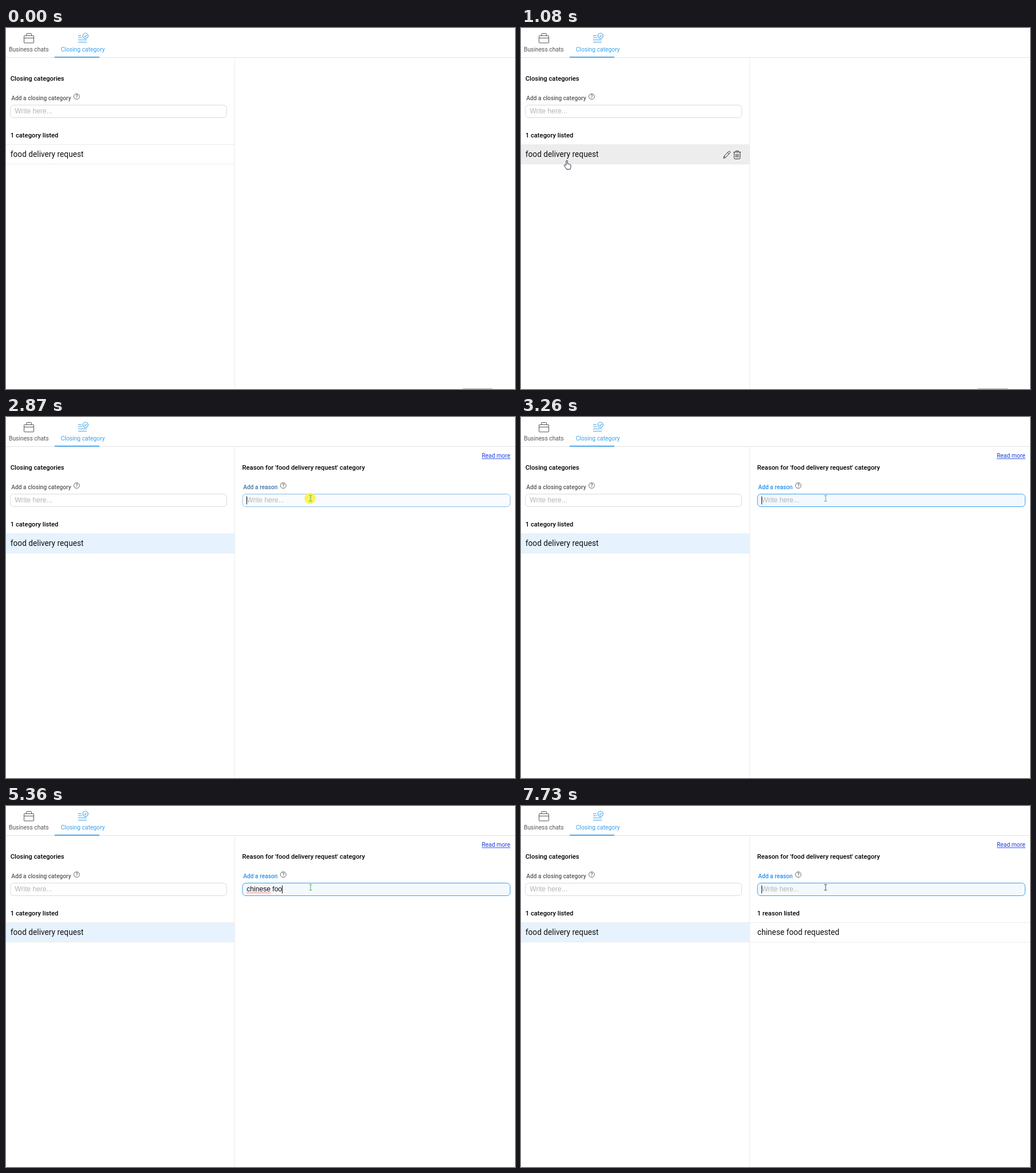
An HTML page for the animation above (8000 ms loop, 889 by 630 pixels).

```html
<!DOCTYPE html>
<html lang="en">
<head>
<meta charset="utf-8">
<title>Closing categories</title>
<style>
html, body { margin: 0; width: 100%; height: 100%; overflow: hidden; background: #fff; }
svg { display: block; }
text { font-family: Roboto, sans-serif; fill: #111; white-space: pre; }
.tab { font-size: 10.32px; fill: #555; }
.head { font-size: 11.25px; font-weight: 500; fill: #000; }
.label { font-size: 10.2px; font-weight: 500; fill: #5a5a5a; }
.row { font-size: 13.74px; }
.input { font-family: "Liberation Sans", Arial, sans-serif; font-size: 12.08px; }
.hint { fill: #b4b4b4; }
.link { font-size: 10.32px; fill: #1a3fe0; }
.blue { fill: #3b9fe8; }
.rule { stroke: #ececec; }
.icon { fill: none; stroke: #555; }
.field { fill: #fff; stroke: #d9d9d9; }
.q { font-size: 8.5px; fill: #444; text-anchor: middle; }
</style>
</head>
<body>
<svg width="889" height="630" viewBox="0 0 889 630">
  <defs>
    <g id="help">
      <circle r="4.9" class="icon" stroke-width=".9"/>
      <text class="q" y="3">?</text>
    </g>
  </defs>

  <!-- header -->
  <g class="icon">
    <rect x="31.5" y="13.5" width="17" height="12.5" rx=".6"/>
    <path d="M31.5 17.5h17M35.5 13.5v-3q0-1 1-1h7q1 0 1 1v3"/>
  </g>
  <g class="icon" style="stroke:#3b9fe8" stroke-width="1.1">
    <path d="M126 13.5h5.5M126 17h6.5M126 20.7h15M126 24.7h15"/>
    <circle cx="138.8" cy="13.6" r="4.6"/>
    <path d="M136.6 13.7l1.7 1.6 2.9-3.2"/>
  </g>
  <text class="tab" x="5" y="41.4">Business chats</text>
  <text class="tab blue" x="95.7" y="41.4">Closing category</text>
  <path d="M0 51.5H889" stroke="#e2e2e2"/>
  <path class="blue" d="M85 50h78v1.8h-78z"/>
  <path class="rule" d="M399.5 52V630"/>
  <path id="dots" d="M798.5 629.5H850" stroke="#555" stroke-dasharray="1 1"/>

  <!-- left column -->
  <text class="head" x="7.7" y="91.8">Closing categories</text>
  <text class="label" x="9.3" y="126">Add a closing category</text>
  <use href="#help" x="123.4" y="119.6"/>
  <rect class="field" x="7.5" y="134.5" width="378" height="22" rx="6"/>
  <text class="input hint" x="15.3" y="149.4">Write here...</text>
  <text class="head" x="7.7" y="190.8">1 category listed</text>
  <rect id="rowBg" y="203" width="399" height="35" fill="none"/>
  <path class="rule" d="M0 203.5H399M0 237.5H399"/>
  <text class="row" x="7.7" y="224.8">food delivery request</text>
  <g id="tools" class="icon" style="stroke:#333">
    <path d="M353.8 227.4l.9-3.8 8-8.2q1.1-.9 2.2.2t.2 2.2l-8 8.3zM360.8 217.3l2.6 2.5M354.8 223.7l2.5 2.4"/>
    <path d="M371 216.6h13M375 216.4v-1.9h5v1.9M372.3 216.8v10.4q0 1.3 1.3 1.3h7.8q1.3 0 1.3-1.3v-10.4M375.2 219.5v6.5M377.5 219.5v6.5M379.8 219.5v6.5"/>
  </g>

  <!-- right column -->
  <g id="panel">
    <text class="link" x="831" y="71">Read more</text>
    <path d="M831 72.8h50" stroke="#1a3fe0" stroke-width=".9"/>
    <text class="head" x="412.5" y="91.8">Reason for 'food delivery request' category</text>
    <text id="label" class="label" x="414.3" y="126">Add a reason</text>
    <use href="#help" x="484.2" y="119.6"/>
    <rect id="field" class="field" x="413" y="134.5" width="467.5" height="22" rx="6"/>
    <text id="hint" class="input hint" x="420.3" y="149.4">Write here...</text>
    <text id="typed" class="input" x="420.3" y="149.4"></text>
    <path id="spell" d="M420.5 151.5H462" stroke="#d8434e" stroke-width="1.2" stroke-dasharray="1.3 .8"/>
    <path id="caret" d="M.5 138.5v14" stroke="#111"/>
    <g id="list">
      <text class="head" x="412.5" y="190.8">1 reason listed</text>
      <path class="rule" d="M400 203.5H889M400 237.5H889"/>
      <text class="row" x="412.7" y="224.8">chinese food requested</text>
    </g>
  </g>

  <!-- pointer -->
  <circle id="halo" r="9.8" fill="#fbf24a" opacity=".9"/>
  <g id="pointer">
    <path id="arrow" d="M0 0V14.5L3.4 11.4 5.6 16.6 7.8 15.7 5.6 10.6H10.2Z" fill="#fff" stroke="#222" stroke-width=".9"/>
    <path id="hand" d="M-1.2 8.4V1.3a1.2 1.2 0 0 1 2.4 0V6c1-.6 2-.4 2.4.6.8-.5 1.8-.2 2 .7.9-.2 1.4.3 1.4 1.3v3c0 1.5-.7 2.2-1 4h-6.4c-.5-2-3.4-4.5-4.2-6.3-.5-1.3.9-2 1.8-1.2z" fill="#fff" stroke="#1c2333"/>
    <path id="beam" d="M-2.6-5h2q.6 0 .6.7v8.6q0 .7-.6.7h-2M2.6-5h-2q-.6 0-.6.7M2.6 5h-2q-.6 0-.6-.7" fill="none"/>
  </g>
</svg>
<script>
const LOOP = 8000;
const PHRASE = "chinese food requested";
const KEYS = [3400, 3600, 3780, 3960, 4120,
  4670, 4800, 4930, 5060, 5190, 5320, 5460, 5590,
  6020, 6160, 6300, 6440, 6570, 6740, 6960, 7260, 7400];
const SELECT = 1540, FOCUS = 2870, SUBMIT = 7560, LISTED = 7730;
const MOVES = [[1920, 135, 224], [2030, 320, 192], [2140, 490, 160], [2250, 577, 144],
  [2310, 570, 144], [2420, 558, 143], [2530, 547, 143], [2640, 538, 142], [2750, 532, 142]];

const $ = {};
document.querySelectorAll("svg [id]").forEach(el => $[el.id] = el);
const show = (el, on) => el.style.display = on ? "" : "none";
const mix = (a, b, k) => `rgb(${a.map((v, i) => Math.round(v + (b[i] - v) * k))})`;

function pointerAt(t) {
  if (t < MOVES[0][0]) {
    const p = Math.min(8, Math.floor((t - 200) / 110)) / 8;
    const left = (1 - p) ** 2;
    return [80 + 487 * left, 231 + 276 * left];
  }
  return MOVES.filter(m => m[0] <= t).pop().slice(1);
}

function drawPointer(t) {
  const [x, y] = pointerAt(t);
  const overRow = t >= 200 && x < 399 && y > 203 && y < 238;
  const overField = t >= 2250;
  show($.pointer, t >= 200);
  $.pointer.setAttribute("transform", `translate(${x} ${y})`);
  show($.hand, overRow);
  show($.beam, overField);
  show($.arrow, !overRow && !overField);
  $.beam.setAttribute("stroke", t < FOCUS ? "#444" : t < SUBMIT ? "#45b552" : "#24653a");

  const rowClick = t >= 1390 && t < SELECT;
  show($.halo, rowClick || (t >= FOCUS && t < 3020));
  $.halo.setAttribute("transform", `translate(${x - 1} ${y + (rowClick ? 7 : 0)})`);

  show($.tools, overRow);
  $.rowBg.setAttribute("fill", t >= SELECT ? "#e6f3fe" : overRow ? "#ededed" : "none");
}

function drawField(t) {
  const focus = t < FOCUS ? 0 : t < 2960 ? .5 : t < 3020 ? .8 : 1;
  $.label.style.fill = mix([90, 90, 90], [38, 143, 240], focus);
  $.field.style.stroke = mix([217, 217, 217], [59, 159, 236], focus);
  $.field.style.fill = mix([255, 255, 255], [243, 249, 254], focus);

  const count = t < SUBMIT ? KEYS.filter(k => k <= t).length : 0;
  const text = PHRASE.slice(0, count);
  if ($.typed.textContent !== text) $.typed.textContent = text;
  show($.hint, !count);
  show($.spell, count > 7);
  show($.caret, focus > 0);
  const width = count ? $.typed.getComputedTextLength() : 0;
  $.caret.setAttribute("transform", `translate(${Math.round(420 + width)} 0)`);
}

function draw(now) {
  const t = now % LOOP;
  show($.dots, t < SELECT);
  show($.panel, t >= SELECT);
  show($.list, t >= LISTED);
  drawPointer(t);
  drawField(t);
}

function tick() {
  draw(performance.now());
  requestAnimationFrame(tick);
}
tick();
</script>
</body>
</html>
```
